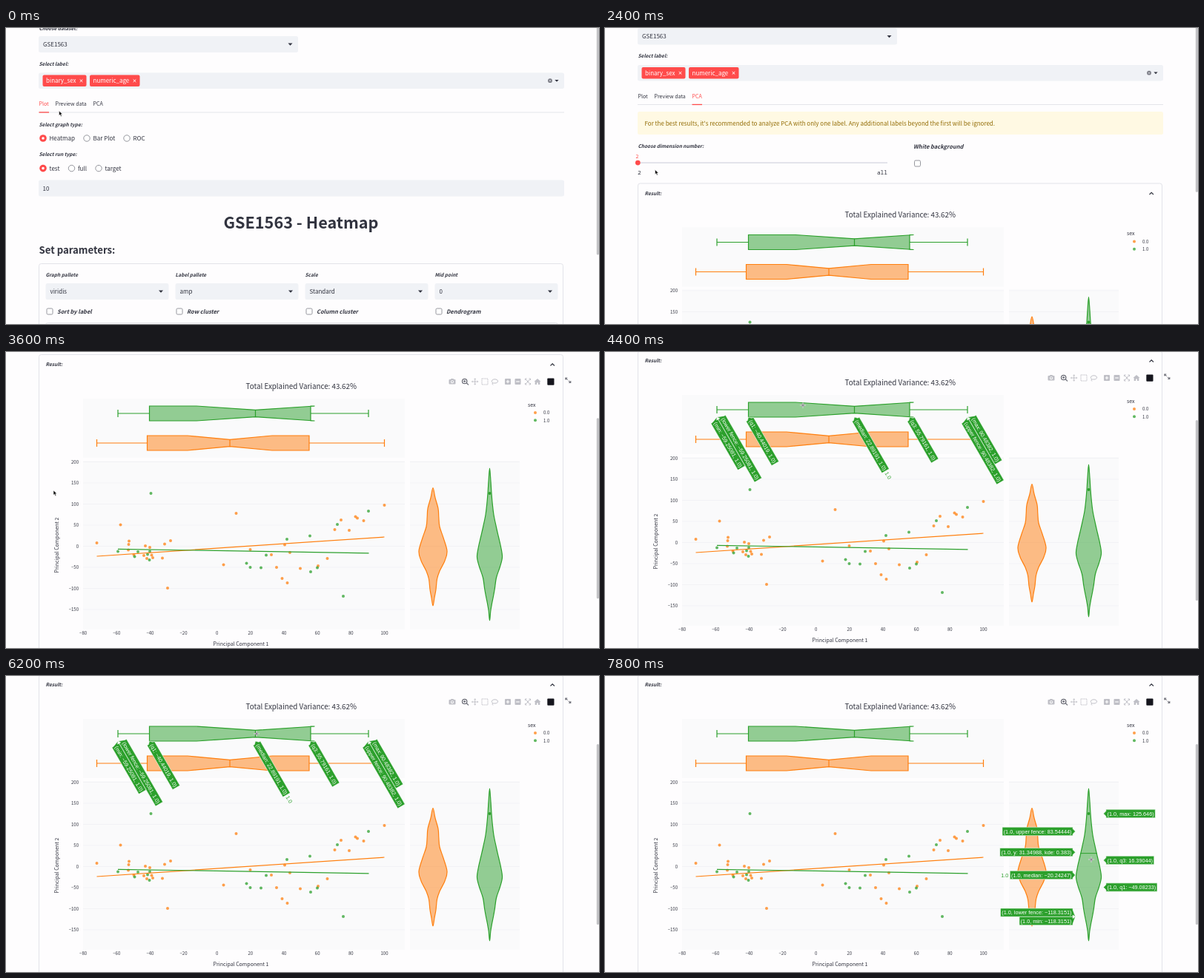
Recreate the animation shown at these times as an HTML page. Size 800x400 px, loop 8 s.

```html
<!DOCTYPE html>
<html lang="en">
<head>
<meta charset="utf-8">
<title>PCA dashboard</title>
<style>
  html, body { margin: 0; width: 100%; height: 100%; overflow: hidden; background: #fefdfe; }
  svg { display: block; width: 100%; height: 100%; }
  text { font-family: "Noto Sans CJK JP", "Noto Sans CJK SC", "Noto Sans CJK", "Noto Sans", sans-serif; fill: #31333f; white-space: pre; }
  .lab { font-weight: 700; font-style: italic; }
  .mono { font-family: "Noto Sans Mono", "DejaVu Sans Mono", monospace; }
  .hover text { font: 7.28px "Liberation Sans", Arial, sans-serif; fill: #fff; }
  .hover text.name { fill: #2ca02c; }
  .hover path { fill: #2ca02c; stroke: #fff; stroke-width: .5; }
</style>
</head>
<body>
<svg id="stage" viewBox="0 0 800 400"></svg>
<script>
const LOOP = 8000, STEP = 200;
const RED = '#ff4b4b', GREY = '#f0f2f6', EDGE = '#e2e3e9', DARK = '#31333f';
const ORANGE = '#ff7f0e', GREEN = '#2ca02c';
const CJK = 0.895; // the CJK face draws its Latin letters larger than the UI face

// ---- drawing helpers, all returning markup ----
const text = (x, y, str, size = 8.95, attr = '') =>
  `<text x="${x}" y="${y + size * 0.33}" font-size="${size * CJK}" ${attr}>${str}</text>`;
const label = (x, y, str, size = 7.35) => text(x, y, str, size, 'class="lab"');
const mono = (x, y, str, attr = '') =>
  `<text class="mono" x="${x}" y="${y + 2.7}" font-size="7.84" ${attr}>${str}</text>`;
const rect = (x, y, w, h, fill, r = 2.5, attr = '') =>
  `<rect x="${x}" y="${y}" width="${w}" height="${h}" rx="${r}" fill="${fill}" ${attr}/>`;
const path = (d, stroke, width = 1, fill = 'none', attr = '') =>
  `<path d="${d}" stroke="${stroke}" stroke-width="${width}" fill="${fill}" ${attr}/>`;
const dot = (x, y, r, fill, attr = '') => `<circle cx="${x}" cy="${y}" r="${r}" fill="${fill}" ${attr}/>`;
const frame = (x, y, w, h) => rect(x, y, w, h, 'none', 3, `stroke="${EDGE}"`);
const caret = (x, y, s = 3) => `<path d="M${x - s} ${y - s / 2}h${2 * s}l${-s} ${s * 1.1}z" fill="${DARK}"/>`;
const select = (x, y, w, str) =>
  rect(x, y - 11, w, 22, GREY) + text(x + 6, y, str) + caret(x + w - 10.5, y);
const checkbox = (x, y) => rect(x - 4, y - 4, 8, 8, '#fff', 1.5, 'stroke="#8b8c94" stroke-width=".9"');
const radio = (x, y, str, on) =>
  (on ? dot(x, y, 4.8, RED) + dot(x, y, 1.8, '#fff')
      : dot(x, y, 4.2, '#fff', 'stroke="#8b8c94" stroke-width=".9"')) + text(x + 8.5, y, str);
const cross = (x, y, s, color, w) =>
  path(`M${x - s} ${y - s}l${2 * s} ${2 * s}m0 ${-2 * s}l${-2 * s} ${2 * s}`, color, w);
const tag = (x, w, str) =>
  rect(x, 63.5, w, 15.5, RED, 2) + text(x + 4.5, 71.3, str, 8.95, 'style="fill:#fff"') + cross(x + w - 7, 71.3, 1.8, '#fff', 1);

// ---- page parts, in page coordinates ----
const header = () =>
  label(44.5, 0.5, 'Choose dataset:') + select(44, 22, 350, 'GSE1563') +
  label(44.5, 48.5, 'Select label:') + rect(44, 60.5, 709, 21.5, GREY) +
  tag(49.5, 59, 'binary_sex') + tag(113, 67.5, 'numeric_age') +
  dot(734, 71.2, 2.9, '#7c7d86') + cross(734, 71.2, 1, GREY, 0.7) + caret(743, 71.2, 2.6) +
  text(44.5, 102.5, 'Plot', 7.84, 'id="tabPlot"') + text(66.5, 102.5, 'Preview data', 7.84) +
  text(117.5, 102.5, 'PCA', 7.84, 'id="tabPca"') +
  path('M44 114H753', '#e4e5ea') + rect(0, 113.3, 13.5, 1.3, RED, 0, 'id="tabLine"');

function heatmapTab() {
  let s = label(44.5, 130.5, 'Select graph type:') +
    radio(50, 149, 'Heatmap', true) + radio(109, 149, 'Bar Plot') + radio(163, 149, 'ROC') +
    label(44.5, 171, 'Select run type:') +
    radio(50, 189.6, 'test', true) + radio(88.5, 189.6, 'full') + radio(125, 189.6, 'target') +
    rect(44, 205.5, 709, 22, GREY) + text(49.5, 216.7, '10') +
    text(398, 263.5, 'GSE1563 - Heatmap', 24.2, 'text-anchor="middle" font-weight="700"') +
    text(44.5, 300, 'Set parameters:', 14.7, 'font-weight="700"') + frame(44.5, 318.5, 707, 200);
  [['Graph pallete', 'viridis', 'Sort by label'], ['Label pallete', 'amp', 'Row cluster'],
   ['Scale', 'Standard', 'Column cluster'], ['Mid point', '0', 'Dendrogram']].forEach(([name, value, check], i) => {
    const x = 53.5 + 175 * i;
    s += label(x, 333.7, name) + select(x, 356, 166, value) + checkbox(x + 5.5, 383) + label(x + 15.5, 383, check, 8.4);
  });
  return s + frame(53.5, 398.5, 691, 60);
}

const pcaTab = () =>
  rect(44, 123.5, 709, 31, '#fff9e3') +
  text(53.5, 139.3, "For the best results, it's recommended to analyze PCA with only one label. Any additional labels beyond the first will be ignored.", 8.95, 'style="fill:#926c05"') +
  label(44.5, 170.5, 'Choose dimension number:') + label(416, 171, 'White background', 8.4) + checkbox(421.5, 193.5) +
  path('M44 192.6H381', '#dfe0e8', 1.8) + dot(44.3, 192.6, 3.4, RED) +
  text(43.5, 184, '2', 7.84, `text-anchor="middle" style="fill:${RED}"`) +
  mono(44, 206, '2') + mono(381, 206, 'all', 'text-anchor="end"') +
  frame(44.5, 220.5, 707, 500) + label(53.5, 234, 'Result:') + path('M734.5 235.5l2.7-2.7 2.7 2.7', DARK, 1.1);

// ---- chart, in its own coordinates ----
const CHART_Y = 222;
const px = v => 284.7 + 2.258 * v, py = v => 257.5 - 0.57 * v;

function box(y, [min, q1, n1, mid, n2, q3, max], color) {
  const t = y - 10, b = y + 10;
  return path(`M${q1} ${t}H${n1}L${mid} ${y - 4.7}L${n2} ${t}H${q3}V${b}H${n2}L${mid} ${y + 4.7}L${n1} ${b}H${q1}z`, color, 1.2, color, 'fill-opacity=".5"') +
    path(`M${mid} ${y - 4.7}v9.4M${q1} ${y}H${min}M${q3} ${y}H${max}M${min} ${y - 5}v10M${max} ${y - 5}v10`, color, 1.2);
}

// Mirrored smooth outline through [y, half width] pairs
function violin(cx, pairs, color) {
  const pts = [...pairs.map(([y, w]) => [cx + w, y]), ...pairs.slice(1, -1).reverse().map(([y, w]) => [cx - w, y])];
  const n = pts.length, at = i => pts[(i + n) % n];
  let d = `M${pts[0]}`;
  for (let i = 0; i < n; i++) {
    const [a, b, c, e] = [at(i - 1), at(i), at(i + 1), at(i + 2)];
    d += `C${b[0] + (c[0] - a[0]) / 6} ${b[1] + (c[1] - a[1]) / 6} ${c[0] - (e[0] - b[0]) / 6} ${c[1] - (e[1] - b[1]) / 6} ${c}`;
  }
  return path(d + 'z', color, 1.2, color, 'fill-opacity=".5"');
}

const scatter = (str, color) => str.split(' ').map(p => {
  const [x, y] = p.split(',');
  return dot(x, y, 2, color, 'opacity=".75"');
}).join('');

const orangePts = '122.5,253 154.5,228.5 166,250.5 165.5,255 165,262.5 188,257 194,259 214,254.5 222,250 172.5,269 186,270 190,274 196.5,269.5 198,273 211,273.5 218,314 310.5,213 293.5,282.5 329.5,262 358,269 376,255.5 383,266 365,286 372.5,301 379.5,307 397,287.5 421,284 433.5,274 443.5,235 452,222 463,236 471.5,217.5 474,219.5 482.5,223 510.5,202';
const greenPts = '195.5,186 151,264.5 178,265 194,264.5 173.5,271.5 191,268.5 193.5,276 324.5,280.5 329.5,286 344,286.5 351,269.5 379,248 410,243.5 420,286.5 411,292 447,228 489,210 455,325';

function chart() {
  const minus = v => String(v).replace('-', '−');
  let s = text(398.3, 41, 'Total Explained Variance: 43.62%', 10.95, 'text-anchor="middle"') +
    rect(104, 58, 434, 80, '#fafafb', 0) + rect(104, 142, 434, 228, '#fafafb', 0) + rect(545, 142, 148, 228, '#fafafb', 0);
  for (let v = -150; v <= 200; v += 50)
    s += path(`M104 ${py(v)}H538M545 ${py(v)}H693`, '#f0f0f4', 0.7) + text(98, py(v), minus(v), 6.7, 'text-anchor="end"');
  for (let v = -80; v <= 100; v += 20) s += text(px(v), 374.5, minus(v), 6.7, 'text-anchor="middle"');
  s += text(317, 389.3, 'Principal Component 1', 7.84, 'text-anchor="middle"') +
    `<g transform="translate(68.7 256) rotate(-90)">${text(0, 0, 'Principal Component 2', 7.84, 'text-anchor="middle"')}</g>` +
    box(78, [151, 193.5, 257, 336.5, 416.5, 411, 489], GREEN) +
    box(118, [122.5, 190.5, 245, 302, 359, 409, 510.5], ORANGE) +
    scatter(orangePts, ORANGE) + scatter(greenPts, GREEN) +
    path('M122.5 271L510.5 245', ORANGE, 1.2) + path('M151 261.3L489.5 266.8', GREEN, 1.2) +
    violin(576, [[178.5, 0], [192, 3], [206.5, 7], [218, 7.8], [231, 9], [246, 14], [264, 19], [277, 16], [291, 9], [302, 5.5], [316, 4], [327, 2], [338, 0]], ORANGE) +
    violin(652.5, [[152, 0], [170, 1.5], [186, 2.5], [200, 3.7], [215, 5.5], [232, 9], [245, 12], [258, 15], [272, 17], [285, 14], [300, 9], [315, 6.8], [325, 5], [335, 3], [345, 1.3], [358, 0]], GREEN) +
    dot(652.5, 186, 1.9, GREEN) + text(704, 66, 'sex', 7.84);
  [['0.0', ORANGE], ['1.0', GREEN]].forEach(([name, color], i) => {
    s += dot(714, 77 + 10.3 * i, 2, color, 'opacity=".75"') + text(725, 77 + 10.3 * i, name, 6.7);
  });
  return s;
}

function modebar() {
  const c = '#bfbfc6', y = 35;
  const zoomBox = (x, sign) => rect(x - 4, y - 4, 8, 8, c, 1) + path(`M${x - 2.3} ${y}h4.6${sign ? `M${x} ${y - 2.3}v4.6` : ''}`, '#fff', 1.2);
  return rect(597.5, 32, 9, 6.5, c, 1) + rect(600, 31, 4, 2, c, 0.5) + dot(602, 35.2, 2, '#fff') + dot(602, 35.2, 1.1, c) +
    path('M621 36.5l3 3M617 34.5h3.4M618.7 32.8v3.4', '#70717b', 1.1) + dot(618.7, 34.5, 3.2, 'none', 'stroke="#70717b" stroke-width="1.3"') +
    path(`M628.5 ${y}h8.4M632.7 ${y - 4.2}v8.4M631.5 32l1.2-1.2 1.2 1.2M631.5 38l1.2 1.2 1.2-1.2M629.7 33.8L628.5 35l1.2 1.2M635.7 33.8l1.2 1.2-1.2 1.2`, c, 0.9) +
    rect(642, y - 4, 8, 8, 'none', 0, `stroke="${c}" stroke-dasharray="1.4 .8"`) +
    path('M657 37c-4-3 0-6 4-5s3 5-1 5-5 0-3 2.500', c, 1) +
    zoomBox(677, true) + zoomBox(690.5, false) +
    path('M700.5 33v-2h2M705.500 31h2v2M707.500 37v2h-2M702.500 39h-2v-2M701.500 32l5 6M706.500 32l-5 6', c, 1) +
    `<path d="M712.500 35l4.500-4 4.500 4h-1.200v4h-2.300v-2.600h-2v2.600h-2.300v-4z" fill="${c}"/>` +
    rect(730.3, 30.5, 9.2, 9.2, '#15151d', 1) +
    path('M754.800 32.500v-2.500h2.500M754.800 30l2.800 2.600M761.800 34v2.500h-2.500M761.800 36.500l-2.800-2.600', '#74757e', 1.1);
}

// ---- hover labels ----
const pen = document.createElement('canvas').getContext('2d');
pen.font = '7.28px "Liberation Sans", Arial, sans-serif';

function tip(x, y, str, { dir = 1, rot = 0, off = 0, name = '' } = {}) {
  const a = 3.4, h = 5.65, w = pen.measureText(str).width + 3.4;
  const anchor = `text-anchor="${dir > 0 ? 'start' : 'end'}"`;
  return `<g transform="translate(${x} ${y}) rotate(${rot})">` +
    `<path d="M0 0L${dir * a} ${off + a}v${h - a}h${dir * w}v${-2 * h}H${dir * a}V${off - a}z"/>` +
    `<text x="${dir * (a + 1.7)}" y="${off + 2.6}" ${anchor}>${str}</text>` +
    (name && `<text class="name" x="${dir * (a + w + 2)}" y="${off + 2.6}" ${anchor}>${name}</text>`) + '</g>';
}

const boxTips = () => [
  [151, 'min: −59.25081', 5.7], [151, 'lower fence: −59.25081', -5.7], [193.5, 'q1: −40.44019', 0],
  [336.5, 'median: 22.89191', 0, '1.0'], [411, 'q3: 55.79161', 0],
  [489, 'max: 90.48382', -5.7], [489, 'upper fence: 90.48382', 5.7]
].map(([x, str, off, name]) => tip(x, 88, `(${str}, 1.0)`, { rot: 60, off, name })).join('');

function violinTips(cy) {
  const v = 31.34988 + (248 - cy) / 0.57, y = py(v);
  const left = (ty, str, o) => tip(634.5, ty, `(1.0, ${str})`, { dir: -1, ...o });
  const right = (ty, str) => tip(672.5, ty, `(1.0, ${str})`);
  return `<path d="M641 ${y}H664" style="stroke:${GREEN};stroke-width:1"/>` +
    left(210, 'upper fence: 83.54444') + left(y - 1.5, `y: ${v.toFixed(5)}, kde: 0.383`) +
    left(269, 'median: −20.24247', { name: '1.0' }) +
    left(325.3, 'lower fence: −118.3151', { off: -5.7 }) + left(325.3, 'min: −118.3151', { off: 5.7 }) +
    right(186, 'max: 125.646') + right(249, 'q3: 16.39044') + right(285.5, 'q1: −49.08233');
}

// ---- scene ----
const arrow = '<path d="M0 0v6.300l1.500-1.300 1 2.400 1.200-.500-1-2.300h2z" fill="#111" stroke="#fff" stroke-width=".5"/>';
const hand = '<path d="M-1.500-4.500c.9-.7 1.500 0 1.500.7v2.300l3 .6c1 .2 1.300.8 1.200 1.700l-.5 3.200h-4l-2.800-3.300c-.5-.9.4-1.300 1-.8l.6.600z" fill="#fff" stroke="#222" stroke-width=".9"/>';
const plus = path('M-3.300 0h6.600M0-3.300v6.600', '#fff', 2) + path('M-3 0h6M0-3v6', '#4a4a52', 0.8);

document.getElementById('stage').innerHTML =
  rect(0, 0, 800, 400, '#fefdfe', 0) +
  `<g id="page">${header()}<g id="heat">${heatmapTab()}</g><g id="pca">${pcaTab()}
    <g transform="translate(0 ${CHART_Y})">${chart()}<g id="bar">${modebar()}</g>
    <g id="boxTips" class="hover">${boxTips()}</g><g id="violinTips" class="hover"></g></g></g></g>` +
  rect(796.8, 0, 3.2, 244, '#c2c2c5', 1.5, 'id="thumb"') +
  `<g id="cursor"><g id="arrow">${arrow}</g><g id="hand">${hand}</g><g id="plus">${plus}</g></g>`;

const $ = id => document.getElementById(id);
const set = (id, key, value) => $(id).setAttribute(key, value);
const show = (id, on) => { $(id).style.display = on ? '' : 'none'; };

function key(t, keys, i = 1) {
  let k = keys.findIndex(p => p[0] > t);
  if (k < 0) return keys[keys.length - 1][i];
  if (k === 0) return keys[0][i];
  const a = keys[k - 1], b = keys[k];
  return a[i] + (b[i] - a[i]) * (t - a[0]) / (b[0] - a[0]);
}

const scrollKeys = [[400, 0], [800, 4], [1600, 4], [2000, 10.5], [2400, 10.5], [3000, 178.5], [3400, 212], [3800, 222]];
const lineKeys = [[1400, 44.5], [1600, 54.5], [1800, 108], [2000, 117.5]];
const cursorKeys = [[200, 71.5, 112], [1200, 127.5, 112], [1600, 127.5, 112], [2200, 67.5, 191.5], [2400, 67.5, 191.5],
  [3000, 64, 187], [3600, 64, 187], [4400, 267, 72], [5000, 267, 72], [6200, 338, 78], [6400, 338, 78], [7200, 650, 228], [7800, 656, 248]];

function draw(t) {
  const scroll = key(t, scrollKeys), pca = t >= 1600;
  const x = key(t, cursorKeys, 1), y = key(t, cursorKeys, 2);
  const onTab = t >= 1200 && t < 1800, inPlot = t > 3000 && x > 104;
  set('page', 'transform', `translate(0 ${-scroll})`);
  show('heat', !pca);
  show('pca', pca);
  $('tabPlot').style.fill = pca ? DARK : RED;
  $('tabPca').style.fill = pca || onTab ? RED : DARK;
  set('tabLine', 'x', key(t, lineKeys));
  set('thumb', 'y', pca ? 92 - 0.54 * (222 - scroll) : -10);
  set('thumb', 'height', pca ? 244 : 316.5);
  show('bar', t >= 2800);
  show('boxTips', t >= 4200 && t < 6600);
  $('violinTips').innerHTML = t >= 7200 ? violinTips(y) : '';
  set('cursor', 'transform', `translate(${x} ${y})`);
  show('arrow', !onTab && !inPlot);
  show('hand', onTab);
  show('plus', inPlot);
}

const start = performance.now();
function tick() {
  const t = (performance.now() - start) % LOOP;
  draw(Math.floor(t / STEP) * STEP);
  requestAnimationFrame(tick);
}
tick();
</script>
</body>
</html>
```
